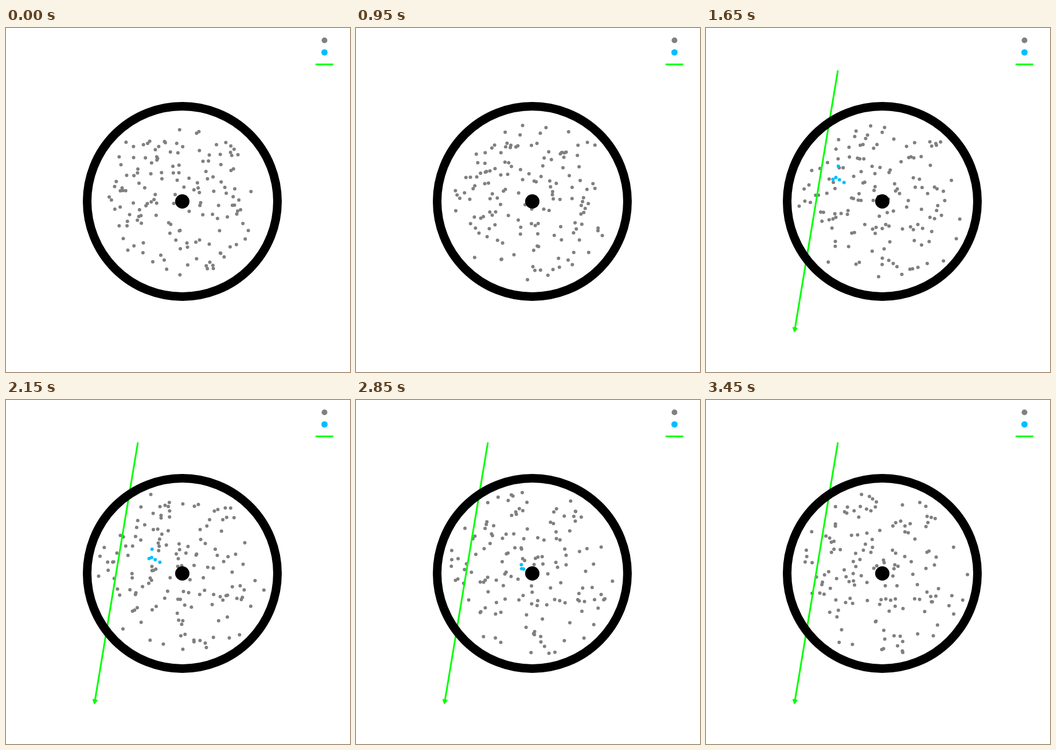
Write an HTML page with a canvas that moves like this. It is 600 px wide and 600 px high and loops after 3500 ms.

```html
<!DOCTYPE html>
<html>
<head>
<meta charset="utf-8">
<style>
  html, body { margin: 0; overflow: hidden; background: #fff; }
  canvas { display: block; }
</style>
</head>
<body>
<canvas id="stage" width="600" height="600"></canvas>
<script>
const ctx = document.getElementById('stage').getContext('2d');
const GREY = '#808080', BLUE = '#00bfff', GREEN = '#00ff00';
const CX = 307.5, CY = 302.5;
const FRAME_MS = 50, FRAMES = 70;
const ATOMS = 145, START_RADIUS = 129, MAX_RADIUS = 149, STEP = 5.5;
const ARROW_START = 20, ARROW_FRAMES = 10;
const ARROW = { x: 230, y: 74, dx: -76, dy: 457 };
const HIT = 25, DRIFT = 3.08;

let seed = 7;
function random() {
  seed = seed + 0x6D2B79F5 | 0;
  let t = Math.imul(seed ^ seed >>> 15, 1 | seed);
  t = t + Math.imul(t ^ t >>> 7, 61 | t) ^ t;
  return ((t ^ t >>> 14) >>> 0) / 4294967296;
}

// Random walk confined to the tube, one position per frame
function walk(x, y, length) {
  const path = [[x, y]];
  while (path.length < length) {
    const nx = x + (random() * 2 - 1) * STEP;
    const ny = y + (random() * 2 - 1) * STEP;
    if (Math.hypot(nx - CX, ny - CY) < MAX_RADIUS) [x, y] = [nx, ny];
    path.push([x, y]);
  }
  return path;
}

const atoms = Array.from({ length: ATOMS }, () => {
  const angle = random() * Math.PI * 2, r = START_RADIUS * Math.sqrt(random());
  return walk(CX + r * Math.cos(angle), CY + r * Math.sin(angle), FRAMES);
});

// Atoms that wander to these points, are ionised there, then drift to the wire
const ions = [[211.5, 225.5], [199, 254], [204.7, 249.4], [210.7, 253.5], [218.7, 258.5]]
  .map(([x, y]) => ({ x, y, before: walk(x, y, HIT + 1) }));

function disc(x, y, r, color) {
  ctx.fillStyle = color;
  ctx.beginPath();
  ctx.arc(x, y, r, 0, Math.PI * 2);
  ctx.fill();
}

function line(x1, y1, x2, y2) {
  ctx.strokeStyle = GREEN;
  ctx.lineWidth = 3;
  ctx.beginPath();
  ctx.moveTo(x1, y1);
  ctx.lineTo(x2, y2);
  ctx.stroke();
}

function drawIon(ion, frame) {
  if (frame < HIT) return disc(...ion.before[HIT - frame], 3, GREY);
  const dx = CX - ion.x, dy = CY - ion.y;
  const k = (frame - HIT) * DRIFT / Math.hypot(dx, dy);
  if (k < 1) disc(ion.x + dx * k, ion.y + dy * k, 3, BLUE);
}

function drawArrow(progress) {
  if (progress <= 0) return;
  const { x, y, dx, dy } = ARROW;
  const length = Math.hypot(dx, dy) * Math.min(progress, 1);
  ctx.save();
  ctx.translate(x, y);
  ctx.rotate(Math.atan2(dy, dx));
  line(0, 0, length - 6, 0);
  ctx.fillStyle = GREEN;
  ctx.lineWidth = 2;
  ctx.lineJoin = 'round';
  ctx.beginPath();
  ctx.moveTo(length - 1.5, 0);
  ctx.lineTo(length - 8, -3.5);
  ctx.lineTo(length - 8, 3.5);
  ctx.closePath();
  ctx.fill();
  ctx.stroke();
  ctx.restore();
}

function draw(frame) {
  ctx.fillStyle = '#fff';
  ctx.fillRect(0, 0, 600, 600);

  atoms.forEach(path => disc(...path[frame], 3, GREY));
  ions.forEach(ion => drawIon(ion, frame));
  drawArrow((frame - ARROW_START) / ARROW_FRAMES);

  // Tube wall and wire
  ctx.strokeStyle = '#000';
  ctx.lineWidth = 15;
  ctx.beginPath();
  ctx.arc(CX, CY, 166, 0, Math.PI * 2);
  ctx.stroke();
  disc(CX, CY, 12.5, '#000');

  // Legend
  disc(555.5, 21.5, 5, GREY);
  disc(555.5, 42.5, 5.5, BLUE);
  line(540, 63.5, 571, 63.5);
}

function tick() {
  draw(Math.floor(performance.now() / FRAME_MS) % FRAMES);
  requestAnimationFrame(tick);
}
tick();
</script>
</body>
</html>
```
